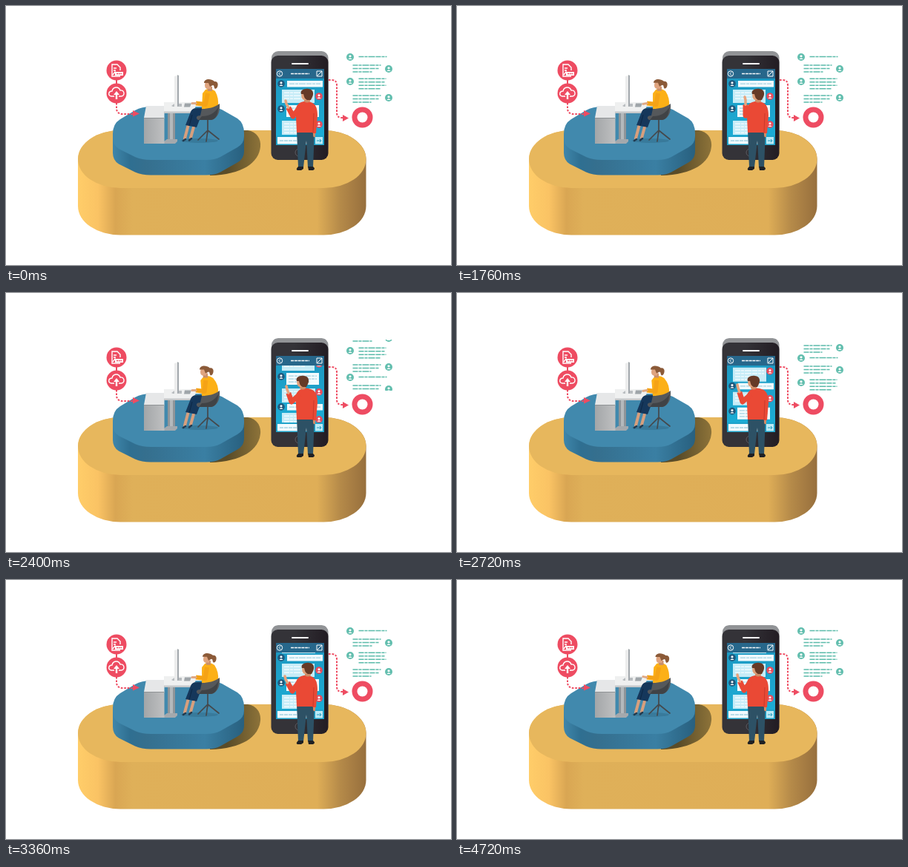
An HTML page for the animation above (4800 ms loop, 600x350 px).

```html
<!DOCTYPE html>
<html lang="en">
<head>
<meta charset="utf-8">
<title>Remote work</title>
<style>
  html, body { margin: 0; width: 100%; height: 100%; overflow: hidden; background: #fff; }
  svg { display: block; width: 600px; height: 350px; }
  .dots { fill: none; stroke: #ee4c62; stroke-width: 2; stroke-dasharray: 2.6 1.8; }
</style>
</head>
<body>
<svg viewBox="0 0 600 350">
  <defs>
    <linearGradient id="tan">
      <stop offset="0" stop-color="#ffcd69"/><stop offset=".07" stop-color="#fac364"/>
      <stop offset=".13" stop-color="#d9a653"/><stop offset=".19" stop-color="#dfb059"/>
      <stop offset=".83" stop-color="#dfae57"/><stop offset=".91" stop-color="#b58a49"/>
      <stop offset="1" stop-color="#976f3d"/>
    </linearGradient>
    <linearGradient id="blue">
      <stop offset="0" stop-color="#3f86aa"/><stop offset=".13" stop-color="#2f6f91"/>
      <stop offset=".25" stop-color="#356f8e"/><stop offset=".7" stop-color="#3a7fa3"/>
      <stop offset="1" stop-color="#28607f"/>
    </linearGradient>
    <linearGradient id="shade">
      <stop offset=".4" stop-color="#5a4c28"/><stop offset="1" stop-color="#8d7339"/>
    </linearGradient>
    <linearGradient id="screen" x2="0" y2="1">
      <stop offset="0" stop-color="#1d97c0"/><stop offset="1" stop-color="#1cafd8"/>
    </linearGradient>
    <linearGradient id="body">
      <stop offset=".4" stop-color="#343338"/><stop offset="1" stop-color="#221c23"/>
    </linearGradient>
    <linearGradient id="cabinet">
      <stop offset="0" stop-color="#a3a6a8"/><stop offset="1" stop-color="#bfc0c1"/>
    </linearGradient>
    <path id="stage" d="M144 173Q144 159 154 153L174 141Q183 136 196 136H270Q282 136 291 140L312 152Q321 158 321 172V176Q321 186 312 191L289 204Q282 208 270 208H195Q183 208 174 204L152 193Q144 188 144 178Z"/>
    <clipPath id="screenClip"><rect x="364" y="98" width="66" height="77"/></clipPath>
    <clipPath id="listClip"><rect x="456" y="63" width="67" height="69"/></clipPath>
  </defs>

  <!-- platforms -->
  <rect x="97" y="168" width="388.500" height="141.500" rx="57" ry="39" fill="url(#tan)"/>
  <rect x="97" y="168" width="388.500" height="78" rx="57" ry="39" fill="#e7b75d"/>
  <path d="M270 168H326C338 170 344 179 343 190C341 212 318 228 275 229Z" fill="url(#shade)"/>
  <g fill="url(#blue)">
    <use href="#stage" y="20.500"/><rect x="144" y="173" width="177" height="22"/>
  </g>
  <use href="#stage" fill="#4189ad"/>

  <!-- upload badges -->
  <path d="M149 99V107" stroke="#ee4c62" stroke-width="2"/>
  <path class="dots" d="M149 131V138Q149 146 158 146H171"/>
  <path d="M171 141L180 145.500L171 149.500Z" fill="#ee4c62"/>
  <g fill="#ee4c62"><circle cx="149" cy="87" r="13.5"/><circle cx="149" cy="118" r="13.5"/></g>
  <g fill="none" stroke="#fff" stroke-width="1.4">
    <path d="M154 87V83L150 79H143V95H154M145 84H149M145 87H148M144 93L147 89L149 93"/>
    <rect x="147" y="89" width="11" height="5" fill="#fff" stroke="none"/>
    <path d="M149 91.5H156" stroke="#ee4c62" stroke-dasharray="2 .7"/>
    <path d="M146 122H142C137 121 138 115 143 115C144 109 152 108 154 114C160 113 161 122 155 122H152"/>
    <path d="M149 126V119" stroke-width="2.4"/>
    <path d="M145 120L149 115L153 120Z" fill="#fff" stroke="none"/>
  </g>

  <!-- desk -->
  <path d="M218 144H228V181H218Z" fill="#8f9599"/><path d="M221 144H225V181H221Z" fill="#b4b9bc"/>
  <path d="M213 183L217 180H231V183L228 186H213Z" fill="#a4a9ad"/>
  <path d="M186 151H213.500V186H186Z" fill="url(#cabinet)"/>
  <path d="M186 151L189 135H213.500V152H186Z" fill="#e6e7e8"/>
  <path d="M186 151.500H213.500" stroke="#8f9395"/>
  <path d="M213 130H259L252 143H213Z" fill="#eff0f0"/><path d="M213 142.500H252V145H213Z" fill="#c5c8ca"/>
  <path d="M223 135L227 132H237V136H225Z" fill="#b9bdc0"/>
  <path d="M227 95L231 94V136H227Z" fill="#eceded"/><path d="M231 93L233 94V135L231 136Z" fill="#a2a8ad"/>
  <path d="M241 131.500H250L248 136.500H240Z" fill="#9fa5a9"/>

  <!-- seated worker -->
  <ellipse cx="261" cy="182" rx="25" ry="3" fill="#32708f" opacity=".6"/>
  <g fill="none" stroke-linecap="round">
    <path d="M272 154V171M272 168L259 181M272 168L287 180M272 168L270 183" stroke="#45484b" stroke-width="1.7"/>
    <path d="M254 160L249 178M246 160L241 179" stroke="#d79f7d" stroke-width="4"/>
    <path d="M250 179L247 181.500M242 180L239 182" stroke="#233b50" stroke-width="2.5"/>
  </g>
  <path d="M258 138H278V151H262L257 164L242 161L249 143Q251 138 258 138Z" fill="#15375b"/>
  <path d="M251 147L247 162" stroke="#0c2744"/>
  <path id="torso" fill="#fcb017"/>
  <path id="arm" fill="none" stroke="#f5a316" stroke-width="6" stroke-linejoin="round"/>
  <path id="typing" fill="none" stroke="#e0a883" stroke-width="3" stroke-linecap="round"/>
  <g id="womanHead">
    <path d="M271 109H278V115H272Z" fill="#c98f6b"/>
    <path d="M269 102L268 107Q268 112 272 112H276L278 102Z" fill="#dfa47f"/>
    <path d="M267 104C267 99 275 97 281 102C286 101 287 107 284 111L282 112C280 110 281 107 279 107L275 109L273 104Z" fill="#8b5a38"/>
  </g>
  <path d="M264 139C273 139 281 137 288 132C289 144 285 152 277 154H259C255 151 257 148 262 148Z" fill="#55585b"/>
  <path d="M264 149Q279 149 286 137C286 149 281 154 276 154H260Z" fill="#404346"/>

  <!-- phone -->
  <rect x="358" y="61" width="76.500" height="140" rx="9" fill="#919396"/>
  <rect x="357.500" y="67" width="77" height="141" rx="9" fill="url(#body)"/>
  <path d="M386 78H407" stroke="#fff" stroke-width="2" stroke-linecap="round"/>
  <circle cx="395" cy="198" r="5" fill="none" stroke="#5c5b60"/>
  <rect x="364" y="85" width="65" height="103" fill="url(#screen)"/>
  <g clip-path="url(#screenClip)"><g id="phoneChat"></g></g>
  <rect x="364" y="85" width="65" height="13" fill="#27678b"/>
  <g fill="none" stroke="#fff">
    <circle cx="369" cy="91.5" r="3.7"/><path d="M370 89.5L368 91.5L370 93.5"/>
    <path d="M384 91.5H409" stroke-width="1.7" stroke-dasharray="4 .8"/>
    <path d="M419 88H426V95H419ZM420 94L426 88"/>
  </g>
  <rect x="364" y="175" width="65" height="13" fill="#1fa3ca"/>
  <rect x="366" y="177" width="49" height="9.500" fill="#f2fbfe"/>
  <path d="M369 182H410" stroke="#a5d3e2" stroke-width="1.3" stroke-dasharray="5 1"/>
  <rect x="417" y="177" width="10" height="9.500" fill="#bdeaf5"/>
  <path d="M419 182H425M423 180L425 182L423 184" fill="none" stroke="#259dc1"/>

  <!-- message feed -->
  <path class="dots" d="M435 100H439Q446 100 446 107V144Q446 151 453 151H455"/>
  <path d="M454 147L462 151.500L454 156Z" fill="#ee4c62"/>
  <circle cx="480.500" cy="150.500" r="14" fill="#ee4c62"/>
  <circle cx="480.500" cy="150.500" r="7" fill="#fff"/>
  <g clip-path="url(#listClip)"><g id="feed"></g></g>

  <!-- standing man -->
  <path d="M392 168H416L414 218H407L405 182L401 218H394Z" fill="#2d5165"/>
  <path d="M394 217H401V220L398 222H393Q390 221 394 217ZM407 217H414Q418 220 414 222H408Z" fill="#1f2023"/>
  <path d="M414 171L417 171L417 177Q414 178 414 175Z" fill="#d08b66"/>
  <path d="M398 130Q405 127 411 130C418 132 420 139 420 148L418 172H414L413 171H392L391 150C390 141 390 133 398 130Z" fill="#ea4935"/>
  <path d="M415 145L414 171" stroke="#c83a2d"/>
  <path id="sleeve" fill="none" stroke="#ea4935" stroke-width="7" stroke-linejoin="round"/>
  <path id="hand" fill="none" stroke="#e8a47d" stroke-width="3.5" stroke-linecap="round"/>
  <g id="manHead">
    <path d="M402 123H410V129Q406 132 402 129Z" fill="#d08b66"/>
    <path d="M399 117C397 122 399 127 403 127H410L412 119Z" fill="#dfa07a"/>
    <path d="M398 119C396 114 402 111 408 112C415 113 415 119 413 123L411 127H406C402 125 402 122 401 119Z" fill="#653a27"/>
  </g>
</svg>
<script>
const LOOP = 4800, STEP = 80;
const $ = id => document.getElementById(id);
const set = (id, name, value) => $(id).setAttribute(name, value);

const avatar = (x, y, r, color) =>
  `<circle cx="${x}" cy="${y}" r="${r}" fill="${color}"/>
   <circle cx="${x}" cy="${y - r * .25}" r="${r * .32}" fill="#fff"/>
   <path d="M${x - r * .55} ${y + r * .6}Q${x} ${y - r * .1} ${x + r * .55} ${y + r * .6}Z" fill="#fff"/>`;

const textLine = (x, y, width, color, weight) =>
  `<path d="M${x} ${y}h${width}" stroke="${color}" stroke-width="${weight}" stroke-dasharray="7 1 4 1 9 1"/>`;

// Each message: avatar y, first line y, line widths
const feedRows = [[69, 68.5, [38]], [85, 80, [38, 36, 26]], [102, 98.2, [37, 35, 37, 29]], [124, 121, [38, 36, 25]]];
const feed = feedRows.map(([y, top, widths], i) =>
  avatar(i % 2 ? 516 : 464, y, 5, '#62beae') +
  widths.map((w, n) => textLine(i % 2 ? 467.5 : 475.5, top + n * 4.5, w, '#5bbbaa', 1.6)).join('')).join('');

// Each bubble: avatar y, left, top, width, height
const bubbles = [[105, 379, 101, 48, 8.5], [122, 372, 113, 44, 18], [139, 378, 134, 44, 16], [160, 372, 155, 45, 19]];
const phoneChat = bubbles.map(([y, x, top, w, h], i) => {
  let out = `<path d="M${x} ${top}h${w}v${h}h${-w}Z" fill="${i % 2 ? '#c6ecf7' : '#f2fbfe'}"/>` +
    avatar(i % 2 ? 422 : 371, y, 4.8, i % 2 ? '#e94b5c' : '#1f587c');
  for (let line = top + 4.2; line < top + h - 2; line += 4)
    out += textLine(x + 3, line, w - (line > top + 12 ? 16 : 6), i % 2 ? '#f8fdff' : '#a5d3e2', 1.3);
  return out;
}).join('');

const repeat = (content, period) => content + `<g transform="translate(0 ${period})">${content}</g>`;
$('feed').innerHTML = repeat(feed, 69);
$('phoneChat').innerHTML = repeat(phoneChat, 75);

const ease = p => (1 - Math.cos(Math.PI * Math.min(1, Math.max(0, p)))) / 2;

// time, woman's head dx, man's head dx, hand x, hand y, elbow x, elbow y
const poses = [
  [0, 0, 0, 378, 132, 387, 149],
  [880, -5.5, -6, 375, 126, 385, 143],
  [1760, -2, 0, 389, 127, 389, 148],
  [2400, -6, -6, 379, 130, 385, 147],
  [2720, -6, -6, 379, 128, 385, 147],
  [3360, -2, 1, 377, 134, 386, 150],
  [4720, 0.5, 0, 379, 132, 387, 149],
  [4800, 0, 0, 378, 132, 387, 149]
];

function poseAt(t) {
  const i = poses.findIndex(p => p[0] > t);
  const a = poses[i - 1], b = poses[i];
  const k = ease((t - a[0]) / (b[0] - a[0]));
  return a.map((v, n) => v + (b[n] - v) * k).slice(1);
}

function draw(t) {
  const [lean, turn, hx, hy, ex, ey] = poseAt(t);
  const scroll = ease((t - 1879) / 1297);
  set('feed', 'transform', `translate(0 ${-69 * scroll})`);
  set('phoneChat', 'transform', `translate(0 ${-75 * scroll})`);

  const s = lean * .45, tap = Math.sin(t / LOOP * Math.PI * 40);
  set('womanHead', 'transform', `translate(${lean} ${lean * .1})`);
  set('torso', 'd', `M${269 + s} 113Q${276 + s} 110 ${282 + s} 115Q287 124 286 135L280 139H264L${265 + s} 118Z`);
  set('arm', 'd', `M${272 + s} 118L${269 + s / 2} 133L256 131.500`);
  set('typing', 'd', `M256 131.500L251 ${131.5 + tap}`);

  set('manHead', 'transform', `translate(${turn} 0)`);
  const wx = hx + (ex - hx) * .3, wy = hy + (ey - hy) * .3;
  set('sleeve', 'd', `M396 137L${ex} ${ey}L${wx} ${wy}`);
  set('hand', 'd', `M${wx} ${wy}L${hx} ${hy}l-1 -4`);
}

function tick() {
  draw(Math.floor(performance.now() % LOOP / STEP) * STEP);
  requestAnimationFrame(tick);
}
tick();
</script>
</body>
</html>
```
